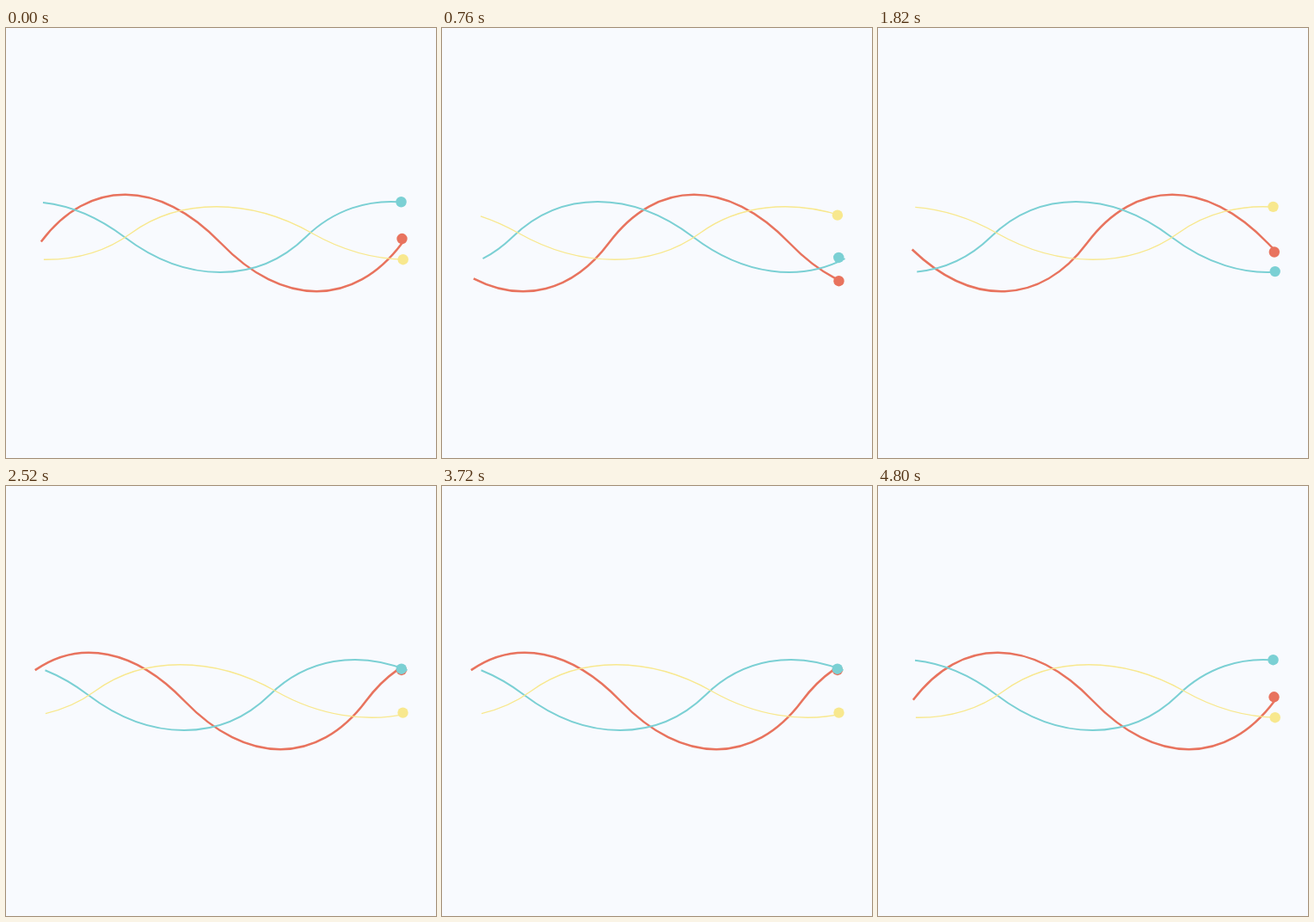
Write an HTML page without scripts that moves like this. It is 500 by 500 pixels and loops after 4.82 s.

```html
<!DOCTYPE html>
<html lang="en">
<head>
<meta charset="utf-8">
<title>Travelling waves</title>
<style>
  /* Number of wave periods travelled; everything else follows from it. */
  @property --turn { syntax: "<number>"; inherits: true; initial-value: 0; }

  html, body { margin: 0; width: 100%; height: 100%; overflow: hidden; background: #f8fafe; }
  svg { display: block; width: 100%; height: 100%; animation: travel 4820ms linear infinite; }

  /* Four turns in 4800 ms, then a 20 ms rest. */
  @keyframes travel {
    from { --turn: 0; }
    99.585%, to { --turn: 4; }
  }

  .red    { --color: #e8735e; --width: 2.5; --start: 0.3;  --rise: 56.2px; --peak: .236; }
  .teal   { --color: #7bd0d4; --width: 2;   --start: 27.3; --rise: 41px;   --peak: -.0125; }
  .yellow { --color: #f8e88e; --width: 1.4; --start: 75.6; --rise: 30.8px; --peak: .507; }

  /* Each path holds six periods of 100 units; one period is visible. */
  path {
    fill: none;
    stroke: var(--color);
    stroke-width: var(--width);
    stroke-dasharray: 100 900;
    stroke-dashoffset: calc((var(--start) + var(--turn) * 100) * -1px);
    transform: translateX(calc(var(--turn) * -421px));
  }

  /* Two harmonics give a swing that eases in and out at both ends. */
  circle {
    --angle: calc((var(--turn) - var(--peak)) * 1turn);
    --lift: calc(.9855 * cos(var(--angle)) + .0122 * cos(3 * var(--angle)));
    fill: var(--color);
    transform: translate(calc(var(--lift) * -1.1px), calc(var(--lift) * var(--rise) * -1));
  }
</style>
</head>
<body>
<svg viewBox="0 0 500 500">
  <g class="red">
    <path pathLength="600" d="M40 250c55-75 138-75 210 0s155 75 211 0
      s138-75 210 0s155 75 211 0s138-75 210 0s155 75 211 0s138-75 210 0s155 75 211 0
      s138-75 210 0s155 75 211 0s138-75 210 0s155 75 211 0"/>
    <circle cx="460.6" cy="250" r="6.2"/>
  </g>
  <g class="teal">
    <path pathLength="600" d="M-72 243c55-54.7 138-54.7 210 0s155 54.7 211 0
      s138-54.7 210 0s155 54.7 211 0s138-54.7 210 0s155 54.7 211 0s138-54.7 210 0s155 54.7 211 0
      s138-54.7 210 0s155 54.7 211 0s138-54.7 210 0s155 54.7 211 0"/>
    <circle cx="460.6" cy="243" r="6.2"/>
  </g>
  <g class="yellow">
    <path pathLength="600" d="M-275 238.5c55-41 138-41 210 0s155 41 211 0
      s138-41 210 0s155 41 211 0s138-41 210 0s155 41 211 0s138-41 210 0s155 41 211 0
      s138-41 210 0s155 41 211 0s138-41 210 0s155 41 211 0"/>
    <circle cx="460.6" cy="238.5" r="6.2"/>
  </g>
</svg>
</body>
</html>
```
